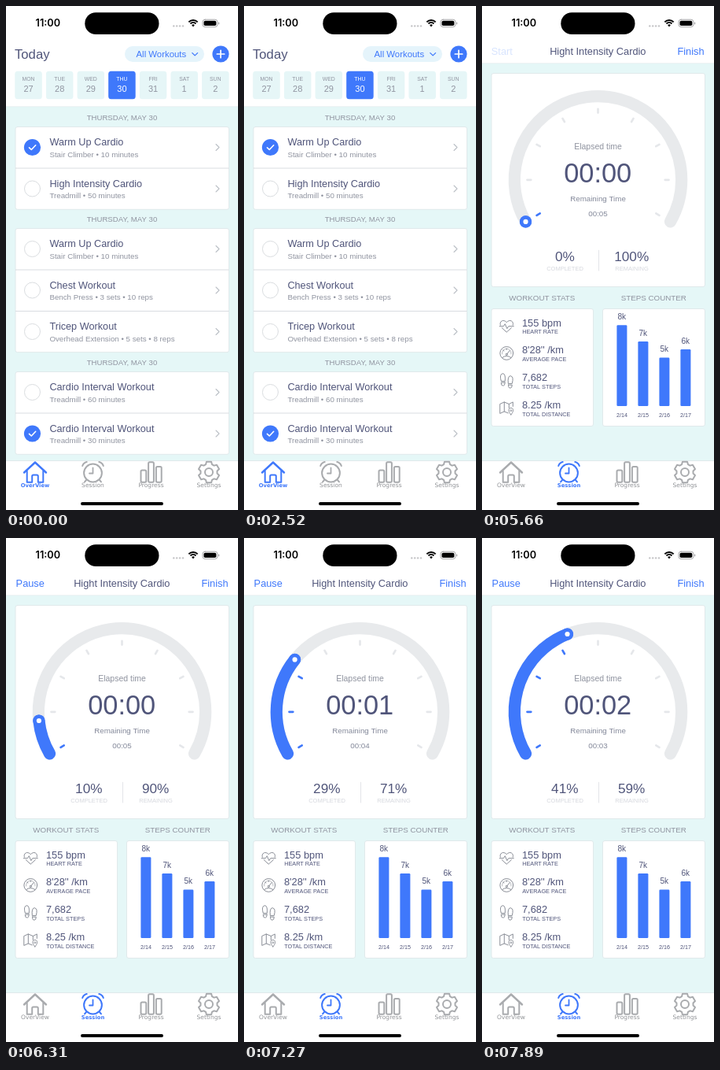
An HTML page with a canvas for the animation above (7990 ms loop, 295x640 px).

```html
<!DOCTYPE html>
<html lang="en">
<head>
<meta charset="utf-8">
<title>Workout tracker</title>
<style>
html, body { margin: 0; width: 100%; height: 100%; overflow: hidden; background: #fff; }
canvas { display: block; width: 295px; height: 640px; }
</style>
</head>
<body>
<canvas id="stage"></canvas>
<script>
const W = 295, H = 640, LOOP = 7990;
const SESSION_AT = 3690, PRESS_AT = 5660, RUN_AT = 5900, TICK = 104.74;
const BLUE = '#3f78fb', INK = '#50557a', GREY = '#9094a0', PALE = '#d6d8de',
      MINT = '#e5f7f7', ICON = '#a9abae', LINE = '#898d96', EDGE = '#e0e9eb';
const SANS = '"Liberation Sans", Arial, sans-serif';
const TAB_FONT = '"DejaVu Sans", Verdana, sans-serif';

const canvas = document.getElementById('stage');
const scale = window.devicePixelRatio || 1;
canvas.width = W * scale;
canvas.height = H * scale;
const c = canvas.getContext('2d');
c.scale(scale, scale);
c.lineCap = c.lineJoin = 'round';

function text(str, x, y, size, color, align = 'left', family = SANS, weight = '') {
  c.font = `${weight} ${size}px ${family}`;
  c.textAlign = align;
  c.fillStyle = color;
  c.fillText(str, x, y);
}

function box(x, y, w, h, r, fill, edge) {
  c.beginPath();
  c.roundRect(x, y, w, h, r);
  if (fill) { c.fillStyle = fill; c.fill(); }
  if (edge) stroke(edge, 1);
}

function stroke(color, width) {
  c.strokeStyle = color;
  c.lineWidth = width;
  c.stroke();
}

function line(color, width, ...pts) {
  c.beginPath();
  for (let i = 0; i < pts.length; i += 2) c.lineTo(pts[i], pts[i + 1]);
  stroke(color, width);
}

function arc(x, y, r, from, to, color, width) {
  c.beginPath();
  c.arc(x, y, r, from * Math.PI / 180, to * Math.PI / 180);
  stroke(color, width);
}

function disc(x, y, r, color) {
  c.beginPath();
  c.arc(x, y, r, 0, Math.PI * 2);
  c.fillStyle = color;
  c.fill();
}

function path(d, color, width) {
  c.strokeStyle = color;
  c.lineWidth = width;
  c.stroke(new Path2D(d));
}

function at(x, y, draw) {
  c.save();
  c.translate(x, y);
  draw();
  c.restore();
}

function statusBar() {
  text('11:00', 53.3, 26.3, 12.7, '#000', 'center', 'Inter, sans-serif', 600);
  box(100.3, 8.3, 94.2, 27.7, 13.85, '#000');
  for (let i = 0; i < 4; i++) disc(213.3 + i * 3.9, 25.4, 1.2, '#c4c4c6');
  c.lineCap = 'butt';
  arc(238, 26, 8, 225, 315, '#000', 2);
  arc(238, 26, 4.9, 225, 315, '#000', 2);
  c.lineCap = 'round';
  c.beginPath();
  c.moveTo(238, 26.4);
  c.arc(238, 26, 2.6, Math.PI * 1.25, Math.PI * 1.75);
  c.fillStyle = '#000';
  c.fill();
  box(250, 17.2, 18.8, 9.4, 3, null, '#a5a5a7');
  box(251.5, 18.7, 15.8, 6.4, 1.8, '#000');
  box(270, 20.4, 1.2, 3, 0.6, '#a5a5a7');
}

function homeIcon(col) {
  path('M-14 0.5 L0 -12.5 L14 0.5', col, 2.4);
  path('M-10.3 -1.5 V12.7 H-3.8 V5 Q-3.8 3.5 -2.3 3.5 H2.3 Q3.8 3.5 3.8 5 V12.7 H10.3 V-1.5', col, 2);
}

function alarmIcon(col) {
  arc(0, 1, 11.4, 0, 360, col, 2);
  path('M0 -5.5 V1.5 H-4.5', col, 1.8);
  for (const s of [-1, 1])
    path(`M${s * 13.3} -8 Q${s * 12} -12 ${s * 7.8} -13 M${s * 8.5} 10 L${s * 10.5} 12.3`, col, 2);
}

function barsIcon(col) {
  for (const [x, y] of [[-13, -2.5], [-3.4, -12.8], [6.4, -7]]) {
    c.beginPath();
    c.roundRect(x, y, 6.8, 12.7 - y, 1.6);
    stroke(col, 2);
  }
}

function gearIcon(col) {
  const pts = [];
  for (let i = 0; i < 6; i++)
    for (const [off, r] of [[-22, 10.6], [-13, 13.6], [13, 13.6], [22, 10.6]]) {
      const a = (i * 60 + 30 + off) * Math.PI / 180;
      pts.push(Math.cos(a) * r, Math.sin(a) * r);
    }
  line(col, 2, ...pts, pts[0], pts[1]);
  arc(0, 0, 5, 0, 360, col, 2);
}

const TABS = [['OverView', 37, homeIcon], ['Session', 110.5, alarmIcon],
              ['Progress', 184.5, barsIcon], ['Settings', 258, gearIcon]];

function tabBar(active) {
  c.fillStyle = '#fff';
  c.fillRect(0, 577, W, 63);
  c.fillStyle = EDGE;
  c.fillRect(0, 577, W, 1);
  TABS.forEach(([name, x, icon], i) => {
    const on = i === active;
    at(x, 592, () => icon(on ? BLUE : ICON));
    text(name, x, 611.2, on ? 6.8 : 7.55, on ? BLUE : '#929498', 'center', TAB_FONT, on ? 'bold' : '');
  });
  box(95, 630, 105, 4, 2, '#000');
}

function backdrop(headerBottom) {
  c.fillStyle = '#fff';
  c.fillRect(0, 0, W, H);
  c.fillStyle = MINT;
  c.fillRect(0, headerBottom, W, 577 - headerBottom);
  c.fillStyle = EDGE;
  c.fillRect(0, headerBottom - 0.5, W, 0.7);
  statusBar();
}

const DAYS = 'MON TUE WED THU FRI SAT SUN'.split(' ');
const DATES = [27, 28, 29, 30, 31, 1, 2];
const SECTIONS = [
  [153.5, [['Warm Up Cardio', 'Stair Climber • 10 minutes', true],
           ['High Intensity Cardio', 'Treadmill • 50 minutes']]],
  [282.5, [['Warm Up Cardio', 'Stair Climber • 10 minutes'],
           ['Chest Workout', 'Bench Press • 3 sets • 10 reps'],
           ['Tricep Workout', 'Overhead Extension • 5 sets • 8 reps']]],
  [464.5, [['Cardio Interval Workout', 'Treadmill • 60 minutes'],
           ['Cardio Interval Workout', 'Treadmill • 30 minutes', true]]]
];

function row([title, detail, done], y) {
  if (done) {
    disc(33.5, y + 26, 10.6, BLUE);
    line('#fff', 1.6, 29.5, y + 26.3, 32.3, y + 29, 37.7, y + 23.3);
  } else {
    arc(33.5, y + 26, 10, 0, 360, '#dadde0', 1);
  }
  text(title, 55.4, y + 23.8, 12.7, INK);
  text(detail, 55.4, y + 38, 9.75, GREY);
  line('#bcc0c6', 1.1, 267, y + 22, 271, y + 26, 267, y + 30);
}

function overview() {
  backdrop(128);
  text('Today', 11, 66.8, 16.7, INK);
  box(151, 51, 101, 20, 10, '#e5f4fb');
  text('All Workouts', 165.5, 64.8, 11.4, BLUE);
  line(BLUE, 1.3, 236.8, 59.6, 240.2, 62.9, 243.6, 59.6);
  disc(273, 61, 10.6, BLUE);
  line('#fff', 1.7, 268.3, 61, 277.7, 61);
  line('#fff', 1.7, 273, 56.3, 273, 65.7);

  DAYS.forEach((day, i) => {
    const x = 11.3 + i * 39.63, on = i === 3;
    box(x, 82.8, 34.5, 35.4, 3.5, on ? BLUE : '#e6f6f7');
    text(day, x + 17.2, 95, 6.9, on ? '#fff' : GREY, 'center');
    text(DATES[i], x + 17.2, 109, 11, on ? '#fff' : GREY, 'center');
  });

  for (const [y, rows] of SECTIONS) {
    text('THURSDAY, MAY 30', 147.5, y - 8.6, 9.6, GREY, 'center');
    box(12, y, 271.5, rows.length * 52.4, 2.5, '#fff', EDGE);
    rows.forEach((r, i) => {
      const top = y + i * 52.5;
      if (i) line('#d9dde1', 1, 12, top, 283, top);
      row(r, top);
    });
  }
  tabBar(0);
}

function heartIcon() {
  path('M-8 -1 C-9.5 -6 -4 -9 0 -4.5 C4 -9 9.5 -6 8 -1 M-6 2.5 L0 8 L6 2.5', LINE, 1);
  path('M-9 0.5 H-4 L-2 -2.5 L0.5 3.5 L2.5 0.5 H9', LINE, 1);
}

function paceIcon() {
  arc(0, 0, 8.4, 0, 360, LINE, 1);
  arc(0, 0, 5.7, 170, 370, '#a4a7ae', 0.8);
  path('M0 1.5 L4 -3.5 M-5.5 5.5 Q0 1.5 5.5 5.5 M0 -6 V-4.5 M-4.5 -4 L-3.3 -3', LINE, 1);
  arc(0, 1.5, 1.2, 0, 360, LINE, 0.9);
}

function stepsIcon() {
  for (const [s, y] of [[-1, -1.5], [1, 1.5]])
    path(`M${s * 2} ${y + 2} Q${s} ${y - 7.5} ${s * 5} ${y - 7.5} Q${s * 9.5} ${y - 6.5} ${s * 7} ${y + 2} Z
          M${s * 2.2} ${y + 4} H${s * 7} Q${s * 7} ${y + 8} ${s * 4.6} ${y + 8} Q${s * 2.2} ${y + 8} ${s * 2.2} ${y + 4} Z`,
         LINE, 1);
}

function mapIcon() {
  path('M2 6.5 L-3 4.5 L-8.5 7 V-5 L-3 -7.5 L3 -5 L8 -7.5 V-2 M-3 -7.5 V4.5 M3 -5 V0', LINE, 1);
  path('M5.5 8.5 C1 3.5 2.5 0 5.5 0 C8.5 0 10 3.5 5.5 8.5 Z', LINE, 1);
  arc(5.5, 3.3, 1, 0, 360, LINE, 0.8);
}

const STATS = [['155 bpm', 'HEART RATE', heartIcon], ["8'28'' /km", 'AVERAGE PACE', paceIcon],
               ['7,682', 'TOTAL STEPS', stepsIcon], ['8.25 /km', 'TOTAL DISTANCE', mapIcon]];
const STEPS = [['8k', '2/14', 405.3], ['7k', '2/15', 426], ['5k', '2/16', 446.5], ['6k', '2/17', 436]];

function clock(sec) {
  return '00:' + String(sec).padStart(2, '0');
}

function gauge(pct) {
  const x = 147.5, y = 220.8, r = 106.2, end = 150 + pct * 2.4;
  const a = end * Math.PI / 180;
  const knobX = x + Math.cos(a) * r, knobY = y + Math.sin(a) * r;
  arc(x, y, r, 150, 390, '#e8eaec', 15.2);
  arc(x, y, r, 150, end, BLUE, 15.2);
  disc(knobX, knobY, 7.6, BLUE);
  disc(knobX, knobY, 3.1, '#fff');
  for (let deg = 150; deg <= 390; deg += 30) {
    const cos = Math.cos(deg * Math.PI / 180), sin = Math.sin(deg * Math.PI / 180);
    line(deg <= end ? BLUE : '#e5e7ea', 2.7,
         x + cos * 85.2, y + sin * 85.2, x + cos * 90, y + sin * 90);
  }

  const sec = Math.floor(pct / 20), whole = Math.round(pct);
  text('Elapsed time', x, 182.2, 10.5, GREY, 'center');
  text(clock(sec), x - 0.3, 224, 34.4, INK, 'center');
  text('Remaining Time', x, 248.4, 9.75, '#858a9b', 'center');
  text(clock(5 - sec), x, 267.4, 9.8, '#858a9b', 'center');
  text(whole + '%', 105.3, 323.8, 17.2, INK, 'center');
  text(100 - whole + '%', 190.2, 323.8, 17.2, INK, 'center');
  text('COMPLETED', 105.5, 335.8, 7.5, PALE, 'center');
  text('REMAINING', 190.5, 335.8, 7.5, PALE, 'center');
  line('#e3e5e9', 1, 148.5, 310, 148.5, 336);
}

function session(t) {
  const running = t >= RUN_AT;
  const step = Math.floor((t - RUN_AT + 10) / TICK);
  const pct = running ? 1.7 + 2.07 * step : 0;

  backdrop(73);
  if (running) text('Pause', 12.6, 61.5, 12.8, BLUE);
  else text('Start', 11.8, 61.5, 12.8, t >= PRESS_AT ? '#d8e4fe' : BLUE);
  text('Hight Intensity Cardio', 147.3, 61.5, 12.8, INK, 'center');
  text('Finish', 282.6, 61.5, 12.8, BLUE, 'right');

  box(12, 85.5, 271.5, 271, 2.5, '#fff', EDGE);
  gauge(pct);

  text('WORKOUT STATS', 76.3, 373.7, 9.8, GREY, 'center');
  text('STEPS COUNTER', 218.3, 373.7, 9.8, GREY, 'center');
  box(12, 384.5, 129.5, 149, 2.5, '#fff', EDGE);
  box(153.5, 384.5, 130, 149, 2.5, '#fff', EDGE);

  STATS.forEach(([value, label, icon], i) => {
    const y = 406.7 + i * 34.75;
    at(31.3, y - 0.5, icon);
    text(value, 51, y, 12.8, INK);
    text(label, 51.2, y + 9.6, 7.3, INK);
  });
  STEPS.forEach(([value, date, top], i) => {
    const x = 178 + i * 27;
    box(x - 6.6, top, 13, 508 - top, 1.3, BLUE);
    text(value, x - 0.2, top - 7.3, 10, INK, 'center');
    text(date, x, 521.5, 7.2, INK, 'center');
  });
  tabBar(1);
}

const start = performance.now();
function frame() {
  const t = (performance.now() - start) % LOOP;
  if (t < SESSION_AT) overview();
  else session(t);
  requestAnimationFrame(frame);
}
frame();
</script>
</body>
</html>
```
